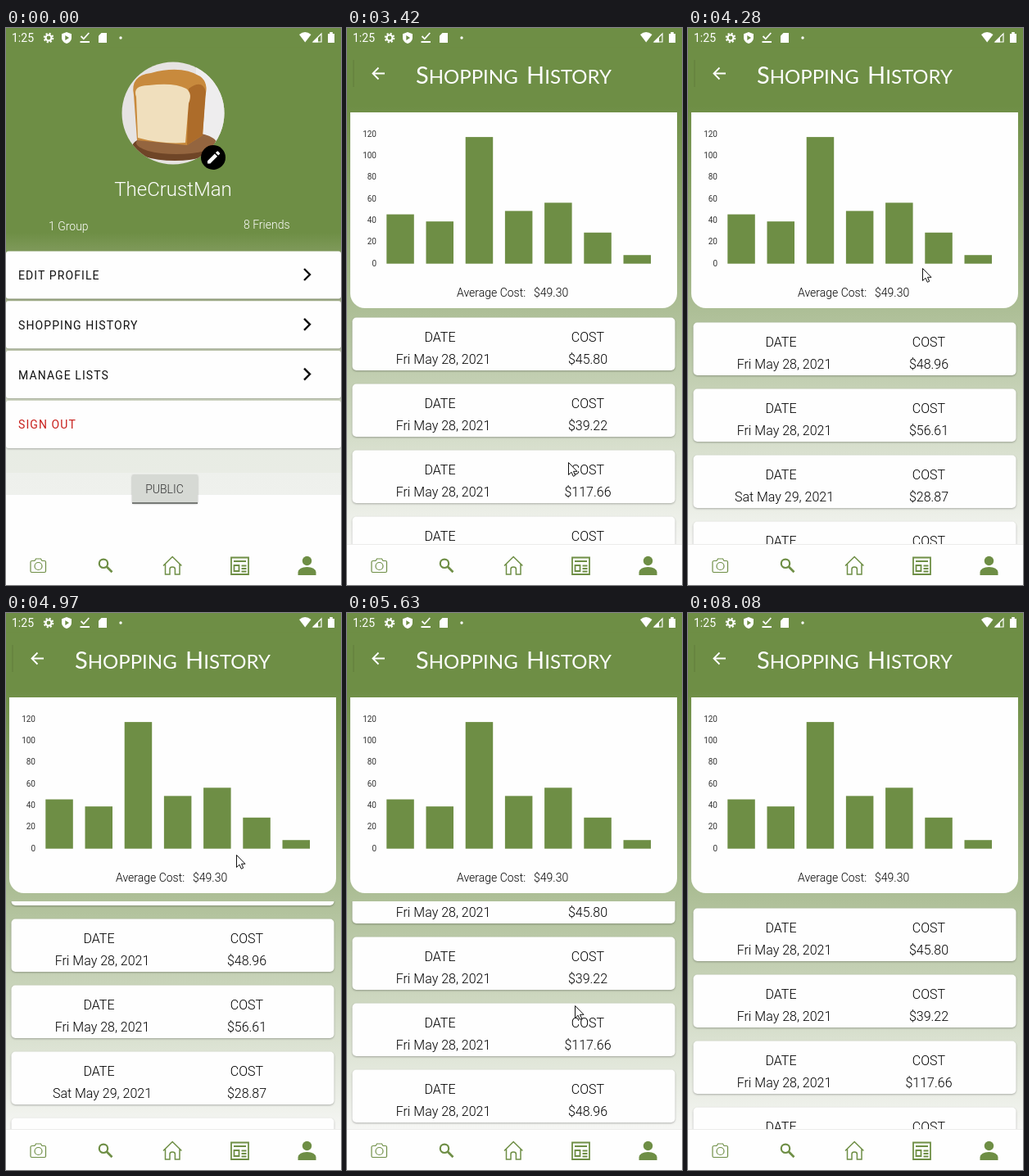
Write an HTML page that moves like this. It is 409x680 px and loops after 8570 ms.

```html
<!DOCTYPE html>
<html lang="en">
<head>
<meta charset="utf-8">
<title>Shopping history</title>
<style>
  html, body { margin: 0; width: 100%; height: 100%; overflow: hidden; background: #fff; }
  svg { display: block; width: 100vw; height: 100vh; font-family: Roboto, sans-serif; }
  .light { font-weight: 300; }
  .mid { text-anchor: middle; }
  .menu { font-size: 14px; letter-spacing: 1.1px; }
  .title { font-family: Lato, sans-serif; font-size: 29px; }
  .title tspan { font-size: 24px; }
  .line { fill: none; stroke: #6e8e45; }
  .card { fill: #fefefe; filter: drop-shadow(0 1px 1px rgba(0, 0, 0, .28)); }
</style>
</head>
<body>
<svg viewBox="0 0 409 680">
  <defs>
    <linearGradient id="oldBg" gradientUnits="userSpaceOnUse" x1="0" y1="250" x2="0" y2="570">
      <stop offset="0" stop-color="#6e8e45"/>
      <stop offset=".26" stop-color="#acb993"/>
      <stop offset=".45" stop-color="#c6cfb3"/>
      <stop offset=".64" stop-color="#d7dec9"/>
      <stop offset=".83" stop-color="#e8ece4"/>
      <stop offset=".915" stop-color="#e9ece5"/>
      <stop offset=".915" stop-color="#eef0ec"/>
      <stop offset="1" stop-color="#eff1ed"/>
    </linearGradient>
    <linearGradient id="newBg" gradientUnits="userSpaceOnUse" x1="0" y1="95" x2="0" y2="640">
      <stop offset="0" stop-color="#6e8e45"/>
      <stop offset="1" stop-color="#f8f8f7"/>
    </linearGradient>
    <clipPath id="face"><circle cx="204" cy="104" r="62.5"/></clipPath>
    <clipPath id="view"><rect y="352" width="409" height="279"/></clipPath>
  </defs>
  <rect width="409" height="680" fill="#fefefe"/>

  <g id="history">
    <rect y="23" width="409" height="608" fill="url(#newBg)"/>
    <path d="M8 39V72" stroke="#000" stroke-opacity=".12"/>
    <path d="M46 55.500H31.500M38.500 48.500l-7 7 7 7" fill="none" stroke="#fff" stroke-width="1.800"/>
    <g class="title" fill="#fff">
      <text x="84" y="68">S<tspan>HOPPING</tspan></text>
      <text x="219" y="68">H<tspan>ISTORY</tspan></text>
    </g>
    <path d="M4 103H403V324a18 18 0 0 1-18 18H22a18 18 0 0 1-18-18Z" fill="#fefefe"/>
    <g id="data">
      <g id="chart" fill="#6e8e45"></g>
      <g class="light" font-size="14">
        <text x="134" y="328">Average Cost:</text>
        <text x="228" y="328">$49.30</text>
      </g>
      <g clip-path="url(#view)"><g id="list" class="mid light" font-size="16"></g></g>
    </g>
  </g>

  <g id="profile">
    <rect y="23" width="409" height="228" fill="#6e8e45"/>
    <rect y="250" width="409" height="320" fill="url(#oldBg)"/>
    <rect y="570" width="409" height="61" fill="#fefefe"/>
    <g clip-path="url(#face)">
      <rect x="141" y="41" width="126" height="126" fill="#e6e3e2"/>
      <path d="M232 41h36v100h-36z" fill="#eeedee"/>
      <ellipse cx="206" cy="145" rx="52" ry="17" fill="#6f4527"/>
      <ellipse cx="208" cy="140" rx="49" ry="14" fill="#94653f"/>
      <path d="M156 82Q151 58 177 55Q214 45 237 59Q248 67 243 84L240 131 221 143 160 137Z" fill="#c88a3d"/>
      <path d="M223 74Q240 62 244 78L240 131 221 143Z" fill="#ad6c2a"/>
      <path d="M159 84Q154 70 174 70Q205 66 220 74Q228 80 223 92L219 140Q190 142 161 134Z" fill="#f0dfbd"/>
    </g>
    <circle cx="253" cy="158" r="15"/>
    <path d="M246 165.500v-3.300l8.800-8.800 3.300 3.300-8.800 8.800zM255.900 152.300l1.600-1.600q.8-.7 1.600 0l1.700 1.700q.7.800 0 1.600l-1.600 1.600z" fill="#fff"/>
    <g class="light" fill="#fff" font-size="14">
      <text class="mid" x="204" y="205" font-size="24">TheCrustMan</text>
      <text x="52" y="247">1 Group</text>
      <text x="290" y="245">8 Friends</text>
    </g>
    <g id="menu" class="menu"></g>
    <rect class="card" x="154" y="545" width="80" height="35" rx="2" style="fill:#d6d9d4"/>
    <path d="M154 580H234" stroke="#777a76" stroke-width="2"/>
    <text class="mid light" x="193.500" y="568" font-size="14" fill="#333">PUBLIC</text>
  </g>

  <g id="status" fill="#fff">
    <rect width="409" height="23.500" fill="#6e8e45"/>
    <text x="7" y="17" font-size="14">1:25</text>
    <g fill="none" stroke="#fff" stroke-width="2.200">
      <circle cx="52" cy="12" r="3.500"/>
      <circle cx="52" cy="12" r="5.300" stroke-width="2" stroke-dasharray="2.100 2.060"/>
      <path d="M91.500 10l3.300 3.300 6.500-7.300M90.500 17h11.500" stroke-width="1.800"/>
    </g>
    <path d="M74 5l6 2.300v4.500c0 3.600-2.500 6.200-6 7.300-3.500-1.100-6-3.700-6-7.300V7.300z"/>
    <path d="M72.300 9l4.700 3-4.700 3z" fill="#6e8e45"/>
    <path d="M116.500 6H123V18H113V9.500z"/>
    <circle cx="140" cy="12" r="1.700"/>
    <path d="M358 8q7-6 14.500 0L365.200 17.500z"/>
    <path d="M375 17h10V7z" fill="none" stroke="#fff" stroke-width="1.200"/>
    <path d="M374.500 17.500h6.500v-6.500z"/>
    <path d="M393 7h2.200V5h3.600v2h2.200V18h-8z"/>
  </g>

  <g id="nav">
    <rect y="631" width="409" height="49" fill="#fefefe"/>
    <path id="edge" d="M0 630.500H409" stroke="#ececea"/>
    <g class="line" stroke-width="1.200">
      <path d="M32 650.500h3l1.500-2.500h6l1.500 2.500h3q1.500 0 1.500 1.500v11q0 1.500-1.500 1.500H31.500q-1.500 0-1.500-1.500v-11q0-1.500 2-1.500z"/>
      <circle cx="39.500" cy="657" r="4.500"/>
      <path d="M192 656.500l11.200-11 11.200 11M194.500 654.500V667h5.500v-6.500q0-2.500 3.200-2.500t3.200 2.500V667H212V654.500" stroke-width="1.500"/>
      <circle cx="119" cy="653.800" r="5.200" stroke-width="2.200"/>
      <path d="M122.800 657.500l6.700 6.700" stroke-width="2.700"/>
      <path d="M275 646.500h21v20.500h-21zM278 651h15M278.500 656h6v7h-6zM287.500 656.500h6M287.500 660h6M287.500 663.500h6" stroke-width="1.800"/>
    </g>
    <g fill="#6e8e45">
      <circle cx="367.500" cy="650.500" r="5.700"/>
      <path d="M356.500 668v-3.500q1-6.500 11-6.500t11 6.500V668z"/>
    </g>
  </g>

  <path id="cursor" d="M.5 .5V15.500L4 12.200 6.300 17.300 8.700 16.200 6.500 11.300H11Z" fill="#fff" stroke="#111"/>
</svg>

<script>
const LOOP = 8570, ARRIVE = 2380, TURN = 4640, MAX_SCROLL = 283;
const $ = id => document.getElementById(id);
const clamp = (v, lo, hi) => Math.min(hi, Math.max(lo, v));

const costs = [45.80, 39.22, 117.66, 48.96, 56.61, 28.87, 7.98];

$('menu').innerHTML = ['EDIT PROFILE', 'SHOPPING HISTORY', 'MANAGE LISTS', 'SIGN OUT'].map((label, i) => {
  const y = 272.5 + 60.8 * i, last = i === 3;
  const arrow = `<path d="M364 ${y + 21.500}l7 7-7 7" fill="none" stroke="#111" stroke-width="2.400"/>`;
  return `<rect class="card" y="${y}" width="409" height="58" rx="3"/>
    <text x="15" y="${y + 34.500}" fill="${last ? '#c8201c' : '#111'}">${label}</text>${last ? '' : arrow}`;
}).join('');

$('chart').innerHTML = costs.map((cost, i) => {
  const h = cost * 1.314, value = 20 * i;
  return `<rect x="${48.300 + 48.200 * i}" y="${287.700 - h}" width="33.500" height="${h}"/>
    <text x="36" y="${290.700 - value * 1.316}" font-size="10" text-anchor="end" fill="#333">${value}</text>`;
}).join('');

$('list').innerHTML = costs.map((cost, i) => {
  const y = 360.5 + 81 * i, day = i < 5 ? 'Fri May 28' : 'Sat May 29';
  return `<rect class="card" x="6.500" y="${y}" width="394" height="64.500" rx="5"/>
    <text x="113.500" y="${y + 29}">DATE</text><text x="294" y="${y + 29}">COST</text>
    <text x="117.500" y="${y + 56}">${day}, 2021</text><text x="294" y="${y + 56}">$${cost.toFixed(2)}</text>`;
}).join('');

// Pointer stops: time, x, y
const stops = [
  [1320, 388, 668], [1450, 372, 600], [1600, 325, 440], [1790, 290, 367], [2620, 290, 367],
  [2950, 276, 480], [3200, 271, 545], [3320, 270, 543], [3420, 270, 530], [3860, 289, 362],
  [4340, 286, 284], [TURN, 284, 242], [4970, 281, 295], [5630, 278, 479], [5850, 279, 525],
  [6110, 280, 525], [6380, 110, 330], [6530, 44, 205], [6680, 140, 114], [6860, 339, 165],
  [7010, 310, 250], [7130, 210, 290], [7250, 136, 230], [7380, 215, 146], [7520, 310, 250],
  [7700, 352, 500], [7850, 362, 614], [8080, 389, 676]
];

// Monotone cubic through the stops, so still phases stay still
function slope(i, k) {
  const a = stops[i - 1], b = stops[i], c = stops[i + 1];
  if (!a || !c) return 0;
  const d0 = (b[k] - a[k]) / (b[0] - a[0]), d1 = (c[k] - b[k]) / (c[0] - b[0]);
  return d0 * d1 <= 0 ? 0 : 2 * d0 * d1 / (d0 + d1);
}
function pointer(t, k) {
  const j = stops.findIndex(s => s[0] > t);
  if (j < 1) return stops[j < 0 ? stops.length - 1 : 0][k];
  const a = stops[j - 1], b = stops[j], span = b[0] - a[0], u = (t - a[0]) / span, v = 1 - u;
  return a[k] * (1 + 2 * u) * v * v + b[k] * (3 - 2 * u) * u * u
    + span * u * v * (slope(j - 1, k) * v - slope(j, k) * u);
}

function scrollAt(t, y) {
  if (t < 3200 || t > 5850) return 0;
  return clamp((t < TURN ? 537 : 525) - y, 0, MAX_SCROLL);
}

function draw(t) {
  const x = pointer(t, 1), y = pointer(t, 2);
  const slide = (1 - Math.cos(Math.PI * clamp((t - 2145) / 265, 0, 1))) / 2;
  const fade = clamp((t - 2125) / 275, 0, 1);
  $('history').setAttribute('transform', `translate(${Math.round(409 * (1 - slide))} 0)`);
  $('profile').setAttribute('opacity', 1 - fade);
  $('data').setAttribute('visibility', t < ARRIVE ? 'hidden' : 'visible');
  $('edge').setAttribute('visibility', t < 2130 ? 'hidden' : 'visible');
  $('list').setAttribute('transform', `translate(0 ${-Math.round(scrollAt(t, y))})`);
  $('cursor').setAttribute('transform', `translate(${Math.round(x)} ${Math.round(y)})`);
  $('cursor').setAttribute('visibility', t < 1350 || t >= 8080 ? 'hidden' : 'visible');
}

const start = performance.now();
function tick() {
  draw((performance.now() - start) % LOOP);
  requestAnimationFrame(tick);
}
tick();
</script>
</body>
</html>
```
